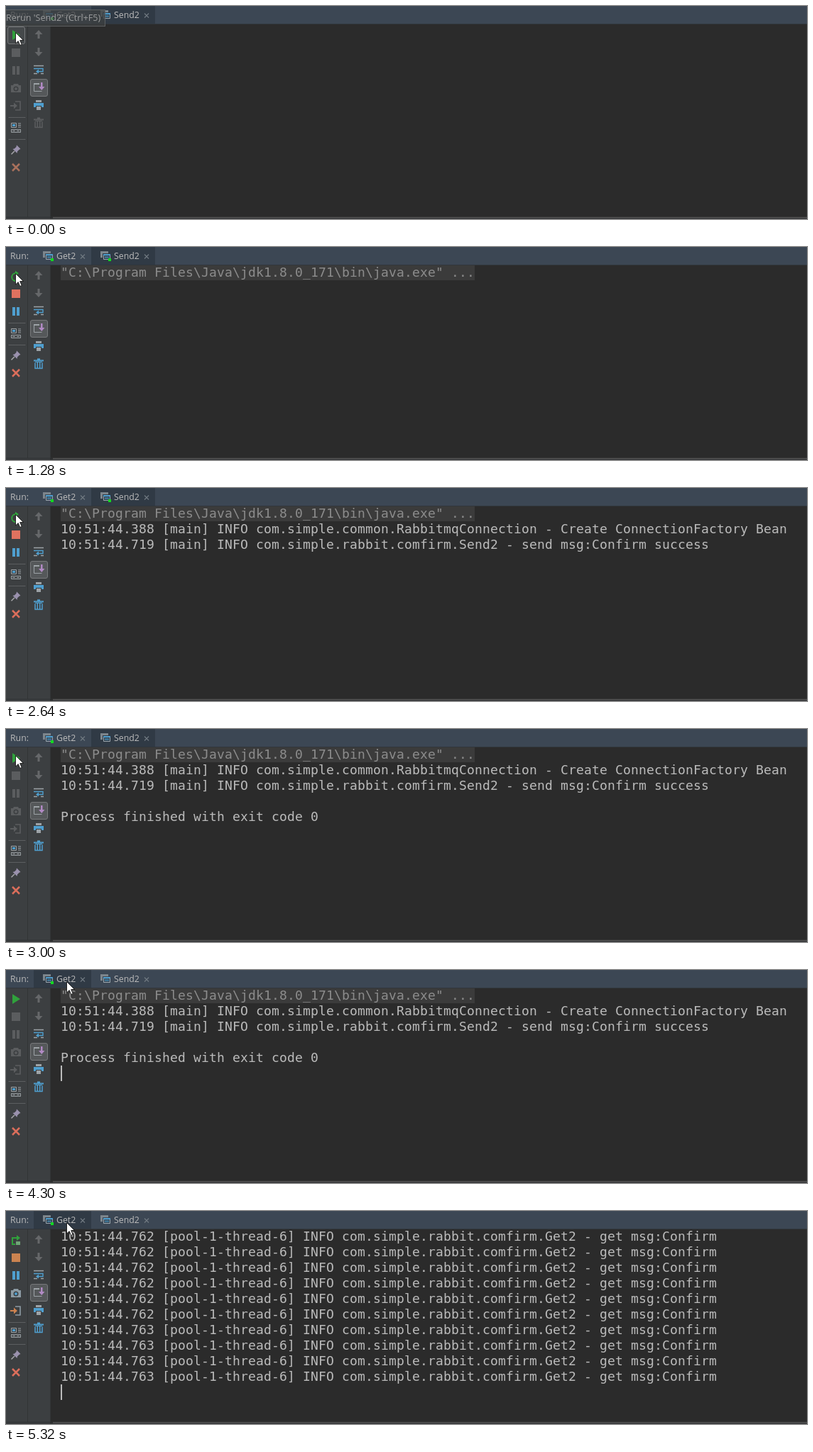
These frames come from a looping animation (1128 px wide and 301 px high, 5600 ms). An HTML page with a canvas:

```html
<!DOCTYPE html>
<html lang="en">
<head>
<meta charset="utf-8">
<title>Run console</title>
<style>
html, body { margin: 0; height: 100%; overflow: hidden; background: #2b2b2b; }
canvas { display: block; }
</style>
</head>
<body>
<canvas id="stage" width="1128" height="301"></canvas>
<script>
const ctx = document.getElementById('stage').getContext('2d');
const LOOP = 5600;
const LINE = 22;
const GREEN = '#30a13c', BLUE = '#4f9fcf', GREY = '#5b5d5f', LIGHT = '#9da3a7', RED = '#db6e5b';

const MONO = '18px "DejaVu Sans Mono", monospace';
const LABEL = '12.3px "Open Sans", "Noto Sans", sans-serif';
const TIP = '12.6px "Open Sans", "Noto Sans", sans-serif';

function rect(x, y, w, h, color) {
  ctx.fillStyle = color;
  ctx.fillRect(x, y, w, h);
}

function text(s, x, y, color, font, spacing = '0px') {
  ctx.font = font;
  ctx.letterSpacing = spacing;
  ctx.fillStyle = color;
  ctx.fillText(s, x, y);
}

// Paints a path around (x, y): filled, or stroked when a width is given.
function shape(x, y, color, d, width) {
  ctx.save();
  ctx.translate(x, y);
  const path = new Path2D(d);
  if (width) {
    ctx.strokeStyle = color;
    ctx.lineWidth = width;
    ctx.stroke(path);
  } else {
    ctx.fillStyle = color;
    ctx.fill(path);
  }
  ctx.restore();
}

function button(x, y, fill) {
  ctx.beginPath();
  ctx.roundRect(x + .5, y + .5, 24, 24, 2.5);
  ctx.fillStyle = fill;
  ctx.fill();
  ctx.strokeStyle = '#77797b';
  ctx.lineWidth = 1;
  ctx.stroke();
}

const cross = (x, y, r, color, w) =>
  shape(x, y, color, `M${-r} ${-r}L${r} ${r}M${r} ${-r}L${-r} ${r}`, w);

function separator(y) {
  for (let x = 4; x < 27; x += 2) rect(x, y, 1, 1, '#7b7d7f');
}

function tab(x, name, selected, live) {
  if (selected) rect(x, 0, name === 'Get2' ? 81 : 90, 25, '#303a45');
  const ix = x + 13;
  shape(ix, 6, '#7d868d', 'M0 0h11v3h-8v6h-3z');
  shape(ix, 6, '#9aa7b0', 'M4.5 4.5h9v7h-9z', 1);
  rect(ix + 4, 10, 10, 2, BLUE);
  rect(ix + 6, 13, 6, 3, '#3f718f');
  if (live) shape(ix + 13, 18, '#12d921', 'M-2-2h4v4h-4z');
  text(name, x + 32, 17, '#bbbbbb', LABEL);
  cross(x + (name === 'Get2' ? 69 : 78), 13.5, 3, '#717a82', 1.1);
}

function header(get, sendLive) {
  rect(0, 0, 1128, 25, '#3c4754');
  rect(0, 25, 1128, 1, '#31363b');
  text('Run:', 6, 17, '#bbbbbb', LABEL);
  tab(39, 'Get2', get, true);
  tab(120, 'Send2', !get, sendLive);
}

function runIcon(mode) {
  if (mode === 'idle') return shape(14, 41, GREEN, 'M-5-7L6 0L-5 7z');
  if (mode === 'send') {
    shape(14, 42, GREEN, 'M-1-5A5.5 5.5 0 1 0 5 2', 2);
    return shape(14, 42, GREEN, 'M-1-8.5L4-5L-1-1z');
  }
  shape(14, 42, GREEN, 'M2-4H-5V5H-1', 2);
  shape(14, 42, GREEN, 'M1-8L6-4L1 0z');
  shape(14, 42, '#6fa577', 'M0 1h6v5h-6z');
}

function cameraAndExit(on) {
  const body = on ? '#8d9ba4' : GREY;
  shape(14, 116, body, 'M-7-4h3l1-2h6l1 2h3v10h-14z');
  shape(14, 117, '#3c3f41', 'M-3.5 0a3.5 3.5 0 1 0 7 0a3.5 3.5 0 1 0-7 0z');
  shape(14, 117, on ? BLUE : GREY, 'M-2 0a2 2 0 1 0 4 0a2 2 0 1 0-4 0z');
  shape(14, 141, body, 'M-1-6h7v12h-7', 1.6);
  shape(14, 141, on ? '#cf8350' : GREY, 'M-8-1h5v-3.5l5 4.5l-5 4.5v-3.5h-5z');
}

function layoutIcon(y) {
  shape(14, y, LIGHT, 'M-6.5-6.5h7v6h-7zM3-6h4M3-3.5h4M3-1h4M-6.5 2.5h13v4h-13z', 1);
  rect(9, y - 5, 4, 3, BLUE);
  rect(9, y + 4, 4, 1, LIGHT);
  rect(15, y + 4, 4, 1, LIGHT);
}

function pinIcon(y) {
  shape(14, y, '#9a91ad', 'M1-6.5L6.5-1L4.5 0L2 2.5L1.5 5L-4.5-1L-2-1.5L.5-4z');
  shape(14, y, '#a9a9ad', 'M-2 2L-6.5 6.5', 1.5);
}

function leftTools(mode, pauseOn, closeColor) {
  const short = mode === 'send';
  const shift = short ? 50 : 0;
  runIcon(mode);
  shape(14, 66, { idle: GREY, send: '#e0725f', get: '#cb8350' }[mode], 'M-6-6h12v12h-12z');
  shape(14, 91, pauseOn ? BLUE : GREY, 'M-5-6h4v12h-4zM1-6h4v12h-4z');
  if (!short) cameraAndExit(mode === 'get');
  separator(157 - shift);
  layoutIcon(172 - shift);
  separator(188 - shift);
  pinIcon(203 - shift);
  cross(14, 228 - shift, 5, closeColor, 2.5);
}

function rightTools(hasOutput) {
  const arrow = 'M0-6L5.5 0H1.5V6H-1.5V0H-5.5z';
  shape(46, 40, '#66686a', arrow);
  shape(46, 65, '#66686a', arrow.replace(/-?\d+(\.\d+)?/g, n => ' ' + -n));
  // soft wrap
  shape(46, 90, LIGHT, 'M-7-5.5h14M-7 5.5h5M3 5.5h4', 1.3);
  shape(46, 90, BLUE, 'M-7-1.5h13v4h-7', 1.4);
  shape(46, 90, BLUE, 'M0-.5v6l-4-3z');
  // scroll to end
  button(34, 103, '#55585a');
  shape(46, 115, LIGHT, 'M1-5.5h-7.500v11h11', 1);
  rect(39, 109, 8, 2, LIGHT);
  shape(46, 115, '#b18ac4', 'M3-7h2.500v6h3l-4.250 5l-4.250-5h3z');
  // print
  rect(42, 133, 8, 3, LIGHT);
  shape(46, 140, BLUE, 'M-7-3h14v6h-3v-2h-8v2h-3z');
  shape(46, 140, LIGHT, 'M-3 2h6v5h-6z');
  // clear all
  const bin = hasOutput ? BLUE : GREY;
  shape(46, 165, bin, 'M-7-5.5h5v-2h4v2h5v2h-14z');
  shape(46, 165, bin, 'M-5-1.500v8h10v-8M-1.700-2v8M1.700-2v8', 1.5);
  rect(41, 162, 10, 1, bin);
}

const print = (row, s, color = '#bbbbbb') =>
  text(s, 77, 42 + row * LINE, color, MONO, '0.163px');

function caret(row) {
  const top = Math.max(26, 25 + row * LINE);
  rect(77, top, 2, 25 + (row + 1) * LINE - top, '#bbbbbb');
}

function sendOutput(t) {
  if (t < 1280) {
    if ((t >= 80 && t < 260) || t >= 770) caret(0);
    return;
  }
  rect(77, 26, 583, 21, '#3b3b3b');
  print(0, '"C:\\Program Files\\Java\\jdk1.8.0_171\\bin\\java.exe" ...', '#8c8c8c');
  if (t >= 2310) print(1, '10:51:44.388 [main] INFO com.simple.common.RabbitmqConnection - Create ConnectionFactory Bean');
  if (t >= 2640) print(2, '10:51:44.719 [main] INFO com.simple.rabbit.comfirm.Send2 - send msg:Confirm success');
  if (t >= 3000) print(4, 'Process finished with exit code 0');
  if (t >= 4300) caret(5);
}

function getOutput(t) {
  for (let row = 0; row < 10; row++) {
    const ms = row < 6 ? 762 : 763;
    print(row, `10:51:44.${ms} [pool-1-thread-6] INFO com.simple.rabbit.comfirm.Get2 - get msg:Confirm`);
  }
  if (t < 4810 || t >= 5320) caret(10);
}

function tooltip(alpha) {
  ctx.globalAlpha = alpha;
  rect(-1, 5, 141, 24, '#3c3f41');
  ctx.strokeStyle = '#686b6d';
  ctx.lineWidth = 1;
  ctx.strokeRect(-1.5, 5.5, 141, 23);
  text("Rerun 'Send2' (Ctrl+F5)", 0, 21, '#bbbbbb', TIP);
  ctx.globalAlpha = 1;
}

function pointer(t) {
  const step = Math.floor((t - 3510) / 51) + 1;
  const p = Math.min(1, Math.max(0, step / 9));
  const e = p * p * (3 - 2 * p);
  const x = 13.5 + 72 * e, y = 37.5 - 21 * e;
  const d = 'M0 0V15.500L3.700 12L6.200 18L8.700 17L6.200 11H11z';
  shape(x, y, '#ffffff', d);
  shape(x, y, '#151515', d, .9);
}

function render(t) {
  const running = t >= 1280 && t < 2820;
  const onGet = t >= 4350;
  const mode = onGet ? 'get' : running ? 'send' : 'idle';

  rect(0, 0, 1128, 301, '#2b2b2b');
  rect(0, 25, 62, 276, '#3c3f41');
  rect(30, 26, 1, 272, '#323435');
  rect(62, 26, 1, 272, '#333536');
  rect(0, 298, 1128, 1, '#303234');
  rect(66, 298, 1062, 2, '#4b4b4b');
  rect(0, 300, 1128, 1, '#333537');

  header(t >= 4250, running);
  if (t < 770) button(2, 29, t < 590 ? '#45494b' : '#55585a');
  else if (t >= 3510 && t < 3612) button(2, 29, '#45494b');
  leftTools(mode, onGet || (t >= 1280 && t < 3000), t < 1280 ? '#a9715c' : RED);
  rightTools(t >= 1280);

  if (onGet) getOutput(t);
  else sendOutput(t);
  if (t < 80) tooltip(t < 30 ? .75 : .35);
  pointer(t);
}

function frame() {
  render(performance.now() % LOOP);
  requestAnimationFrame(frame);
}
frame();
</script>
</body>
</html>
```
